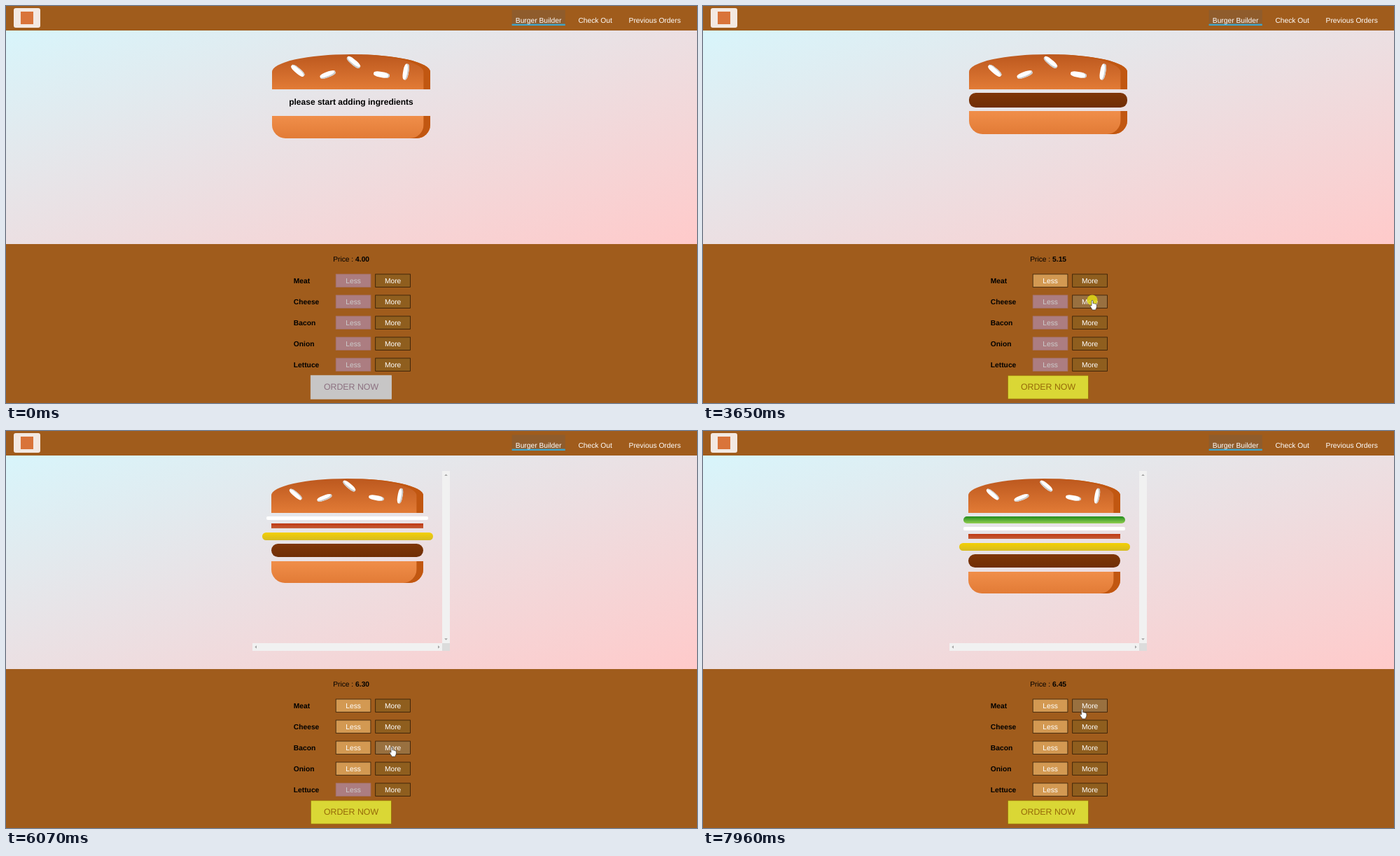
Animation of 987 by 567 pixels, one loop 8 s. Source, as an HTML page:

```html
<!DOCTYPE html>
<html lang="en">
<head>
<meta charset="utf-8">
<title>Burger Builder</title>
<style>
html, body { margin: 0; width: 100%; height: 100%; overflow: hidden; }
body { position: relative; font-family: "Liberation Sans", Arial, sans-serif; text-rendering: geometricPrecision; background: #a05c1c; }
#hero { position: absolute; left: 0; top: 34.5px; width: 987px; height: 305px; background: linear-gradient(to bottom right, #d8f5fb, #ffcaca); }
#burger { position: absolute; left: 352px; top: 63px; display: flow-root; }
#burger > div { margin: 2% auto; position: relative; }
#burger h3 { margin: 12px 0; font-size: 12.03px; line-height: 13.8px; text-align: center; }
.top { width: 80%; height: 20%; background: linear-gradient(#bc581e, #e27b36); border-radius: 50% 50% 0 0; box-shadow: inset -9.6px 0 #c15711; }
.bottom { width: 80%; height: 13%; background: linear-gradient(#f08e4a, #e27b36); border-radius: 0 0 19.3px 19.3px; box-shadow: inset -9.6px 0 #c15711; }
.meat { width: 80%; height: 8%; background: linear-gradient(#7f3608, #702e05); border-radius: 9.6px; }
.cheese { width: 90%; height: 4.5%; background: linear-gradient(#f4d004, #d6bb22); border-radius: 12.8px; }
.bacon { width: 80%; height: 3%; background: linear-gradient(#bf3813, #c45e38); }
.onion { width: 85%; height: 2%; background: #fff; border-radius: 2px; }
.lettuce { width: 85%; height: 4%; background: linear-gradient(#228c1d, #91ce50); border-radius: 12.8px; }
.seeds, .seeds::before, .seeds::after { position: absolute; background: #fff; border-radius: 40%; }
.seeds { width: 10%; height: 15%; top: 50%; }
.seeds::before, .seeds::after { content: ""; width: 100%; height: 100%; }
.s1 { left: 30%; transform: rotate(-20deg); box-shadow: inset -1.3px -1.9px #c9c9c9; }
.s1::after { left: -170%; top: -260%; transform: rotate(60deg); box-shadow: inset -.6px 1.3px #c9c9c9; }
.s1::before { left: 180%; top: -50%; transform: rotate(60deg); box-shadow: inset -.6px -1.9px #c9c9c9; }
.s2 { left: 64%; transform: rotate(10deg); box-shadow: inset -1.9px 0 #c9c9c9; }
.s2::before { left: 150%; top: -130%; transform: rotate(90deg); box-shadow: inset .6px 1.9px #c9c9c9; }
.s2::after { display: none; }
svg { position: absolute; left: 0; top: 0; font-size: 10.28px; }
</style>
</head>
<body>
<div id="hero"></div>
<div id="burger"></div>
<svg id="ui" width="987" height="567" viewBox="0 0 987 567">
  <rect x="11" y="3" width="38" height="28" rx="3" fill="#f3e9e2"/>
  <rect x="21" y="8" width="18" height="18" fill="#d9743a"/>
  <rect x="722.6" y="5.5" width="76.2" height="22.5" fill="#8f5c2c"/>
  <rect x="722.6" y="25.6" width="76.2" height="2.4" fill="#40a4c8"/>
  <g fill="#fff">
    <text x="727.8" y="24.4">Burger Builder</text>
    <text x="817.4" y="24.4">Check Out</text>
    <text x="889.6" y="24.4">Previous Orders</text>
  </g>
  <g id="bars">
    <path fill="#f1f1f1" d="M623 57h11v246h-11zM352 303h271v11h-271z"/>
    <path fill="#dcdcdc" d="M623 303h11v11h-11z"/>
    <path fill="#a3a3a3" d="M626.2 64l2.3-2.6 2.3 2.6zM626.2 296.2l2.3 2.6 2.3-2.6zM358 306.2l-2.6 2.3 2.6 2.3zM617 306.2l2.6 2.3-2.6 2.3z"/>
  </g>
  <text x="493.1" y="364.7" text-anchor="middle">Price : <tspan id="price" font-weight="bold"></tspan></text>
  <g id="rows"></g>
  <rect id="orderBox"/>
  <text id="orderText" x="493" y="548.3" text-anchor="middle" font-size="12.34">ORDER NOW</text>
  <circle id="spot" r="7.6" fill="#e4e012" fill-opacity=".8"/>
  <g id="cursor" fill="#fff" stroke="#222" stroke-width=".6" stroke-linejoin="round">
    <path id="arrow" d="M0 0V10.3L2.4 8.2 4 11.9 5.7 11.2 4.1 7.6H7.4Z"/>
    <path id="hand" d="M-1 1Q0-.6 1.1 1V5Q2.3 4 3.2 5.3 4.4 4.5 5 5.8 6.3 5.3 6.4 7V9.6Q6.3 11.4 5.2 12.4V14H-.3V12.7Q-2.2 10.6-3.1 8.3-2.9 6.8-1 8.2Z"/>
  </g>
</svg>
<script>
const LOOP = 8000;
const $ = id => document.getElementById(id);

// click: time the spot lights up, add: time the layer appears
const items = [
  { name: 'Meat', cost: 1.15, click: 2710, add: 2800 },
  { name: 'Cheese', cost: .5, click: 3650, add: 3730 },
  { name: 'Bacon', cost: .5, click: 5920, add: 6070 },
  { name: 'Onion', cost: .15, click: 4900, add: 5050 },
  { name: 'Lettuce', cost: .15, click: 7170, add: 7320 }
];
const stack = ['Lettuce', 'Onion', 'Bacon', 'Cheese', 'Meat'];
const scrollAt = 6070;

// pointer path: time, x, y
const path = [
  [490, 978, 563], [610, 964, 557], [990, 964, 557], [1240, 850, 470],
  [1540, 705, 376], [1690, 645, 350], [1780, 609, 359], [1940, 575, 380],
  [2160, 553, 398], [2410, 553, 398], [2480, 556, 393], [2850, 556, 393],
  [3340, 556, 420], [3960, 556, 420], [4270, 558, 465], [4400, 558, 465],
  [4580, 558, 466], [4730, 553.5, 478.5], [5130, 553.5, 478.5],
  [5520, 551.5, 454], [5690, 551, 451], [6550, 551, 451], [7000, 560.5, 506],
  [7100, 560.5, 512], [7410, 560.5, 511], [7720, 539, 402], [7900, 539, 402],
  [7960, 541.5, 397]
];

function pointer(t) {
  const i = path.findIndex(p => p[0] > t);
  if (i < 0) return path[path.length - 1].slice(1);
  if (i === 0) return null;
  const [a, b] = [path[i - 1], path[i]];
  const u = (t - a[0]) / (b[0] - a[0]);
  return [a[1] + (b[1] - a[1]) * u, a[2] + (b[2] - a[2]) * u];
}

function set(el, attrs) {
  for (const k in attrs) el.setAttribute(k, attrs[k]);
  return el;
}

function add(parent, tag, attrs, text = '') {
  const el = set(document.createElementNS('http://www.w3.org/2000/svg', tag), attrs);
  el.textContent = text;
  return parent.appendChild(el);
}

function button(x, y, label) {
  const box = add($('rows'), 'rect', { x, y: y - 9, width: 49.7, height: 18.5, 'stroke-width': .8 });
  const text = add($('rows'), 'text', { x: x + 24.9, y: y + 3.7, 'text-anchor': 'middle', fill: '#fff' }, label);
  return { box, text };
}

items.forEach((it, i) => {
  it.y = 392 + 30 * i;
  add($('rows'), 'text', { x: 410.8, y: it.y + 3.7, 'font-weight': 'bold' }, it.name);
  it.less = button(471.2, it.y, 'Less');
  it.more = button(527.7, it.y, 'More');
});

let shown = '';
function drawBurger(added, scrolled) {
  const key = added.map(it => it.name).join() + scrolled;
  if (key === shown) return;
  shown = key;
  const layers = stack.filter(n => added.some(it => it.name === n))
    .map(n => `<div class="${n.toLowerCase()}"></div>`).join('');
  $('burger').style.width = (scrolled ? 271.4 : 282) + 'px';
  $('burger').style.height = (scrolled ? 240.5 : 251.2) + 'px';
  $('burger').innerHTML =
    '<div class="top"><div class="seeds s1"></div><div class="seeds s2"></div></div>' +
    (layers || '<h3>please start adding ingredients</h3>') +
    '<div class="bottom"></div>';
}

function draw(t) {
  const added = items.filter(it => t >= it.add);
  const scrolled = t >= scrollAt;
  const p = pointer(t);
  let over = false;

  drawBurger(added, scrolled);
  $('bars').style.display = scrolled ? '' : 'none';
  $('price').textContent = added.reduce((sum, it) => sum + it.cost, 4).toFixed(2);

  for (const it of items) {
    const on = t >= it.add;
    const hover = p && p[0] > 527.5 && p[0] < 577.5 && Math.abs(p[1] - it.y) < 9.6;
    over = over || hover;
    set(it.less.box, { fill: on ? '#d39952' : '#ac7d81', stroke: on ? '#33200a' : '#a4706c' });
    set(it.less.text, { fill: on ? '#fff' : '#ccc' });
    set(it.more.box, { fill: hover ? '#99703f' : '#8f5e1e', stroke: '#2e1a05' });
  }

  const ready = added.length > 0;
  set($('orderBox'), {
    x: 435.3, y: 527.8, width: 115.2, height: 33.4, 'stroke-width': .8,
    fill: ready ? '#dad735' : '#c7c6c6', stroke: ready ? '#966909' : '#ccc'
  });
  set($('orderText'), { fill: ready ? '#966909' : '#8c7080' });

  const clicked = p && items.some(it => t >= it.click && t < it.add);
  $('spot').style.display = clicked ? '' : 'none';
  $('cursor').style.display = p ? '' : 'none';
  if (!p) return;
  set($('spot'), { cx: p[0], cy: p[1] });
  set($('cursor'), { transform: `translate(${p[0]} ${p[1]})` });
  $('hand').style.display = over ? '' : 'none';
  $('arrow').style.display = over ? 'none' : '';
}

const start = performance.now();
function tick() {
  draw((performance.now() - start) % LOOP);
  requestAnimationFrame(tick);
}
tick();
</script>
</body>
</html>
```
